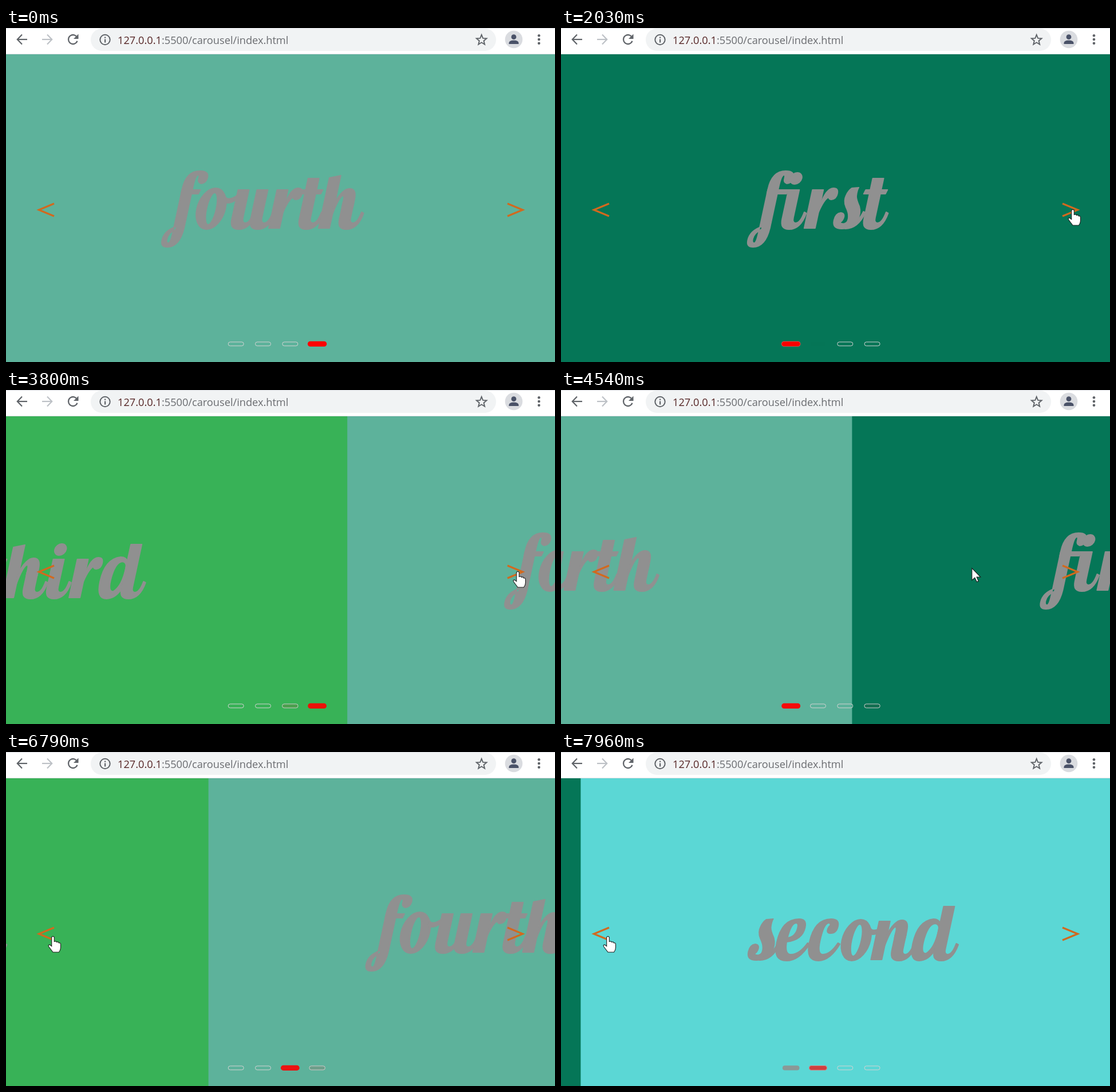
Animation, 959 px wide and 584 px high, one loop 8000 ms. Source, as an HTML page with a canvas:

```html
<!DOCTYPE html>
<html lang="en">
<head>
<meta charset="utf-8">
<title>Carousel</title>
<style>
html, body { margin: 0; width: 100%; height: 100%; overflow: hidden; background: #fff; }
canvas { display: block; width: 959px; height: 584px; }
</style>
</head>
<body>
<canvas id="stage" width="959" height="584" role="img" aria-label="Carousel: first, second, third, fourth"></canvas>
<script>
const g = document.getElementById('stage').getContext('2d');
const W = 959, H = 584, BAR = 46, LOOP = 8000;
const PITCH = 965, REST = -3, SLIDE = 690, FADE = 480;
const SLANT = 0.215;

// Script letters, drawn upright on the baseline and slanted when painted.
const hook = (x, h) =>
  `M${x} ${-h}h19V-18q0 9 6 9q8 0 11-19l4 2q-4 28-24 28q-16 0-16-18z`;
const bar = x => `M${x}-67h38l-2 7h-38z`;
const disc = (x, y, r) => `M${x - r} ${y}a${r} ${r} 0 1 0 ${2 * r} 0a${r} ${r} 0 1 0 ${-2 * r} 0z`;
const arch = 'M17-40Q26-69 39-69Q52-69 52-50V-38H33V-50Q33-58 30-57Q24-54 19-25z';
const F = 'M0 6V-68Q0-100 24-100Q41-100 40-87Q39-78 31-78Q24-80 25-87Q25-93 23-93Q18-93 18-70V0Q17 33-4 33Q-16 33-16 21Q-16 4 4-3V2Q-8 8-8 19Q-8 26-4 26Q0 26 0 6z';
const shapes = {
  f: [F, 'M0-67h32l-2 7h-30z'],
  F: [F, 'M0-67h36l-2 7h-34z', disc(45, -87, 10)],
  o: ['M0-34a25 36 0 1 0 50 0a25 36 0 1 0-50 0zM17-34a8.5 28 0 1 0 17 0a8.5 28 0 1 0-17 0z',
      'M44-56Q52-46 66-58l2 6Q56-40 44-46z'],
  u: [hook(0, 67), hook(33, 67)],
  r: ['M0-67h19V0h-19z', 'M19-40Q23-70 36-70Q45-70 45-60Q45-51 37-50Q33-50 31-54Q24-50 19-28z'],
  t: [hook(0, 87), bar(-8)],
  h: ['M0-88L19-92V0H0z', arch, hook(33, 45)],
  n: ['M0-67h19V0H0z', arch, hook(33, 45)],
  I: [hook(0, 67)],
  i: [hook(0, 67), disc(9, -84, 10)],
  s: ['M32-71Q30-66 31-56Q32-50 40-38Q46-26 42-14Q36 1 18 1Q1 1 1-14Q1-26 10-27Q18-26 17-18Q16-12 12-10Q15-7 20-8Q27-10 25-20Q24-27 17-37Q10-48 13-58Q15-66 20-70z',
      'M28-6Q44-9 49-29l4 2Q46 1 24 1z'],
  e: ['M54-29l4 2Q46 2 24 2Q0 2 0-30Q0-71 30-71Q44-71 44-56Q44-34 17-31Q18-9 29-9Q44-9 54-29zM17-38Q31-40 31-56Q31-64 27-64Q18-64 17-38z'],
  c: ['M50-29l4 2Q43 2 23 2Q0 2 0-30Q0-71 29-71Q44-71 44-58Q44-46 34-46Q26-46 27-54Q28-58 30-60Q30-64 27-64Q18-64 18-32Q18-9 28-9Q41-9 50-29z'],
  d: ['M42-62Q36-71 27-71Q0-68 0-28Q0 2 18 2Q34 2 42-18zM40-52Q40-20 27-11Q18-9 18-30Q19-62 32-63Q40-62 40-52z',
      hook(40, 93)]
};
const glyphs = {};
for (const k in shapes) glyphs[k] = shapes[k].map(d => new Path2D(d));

const slides = [
  { color: '#057657', word: 'FIrst', base: 350, xs: [347, 383, 425, 473, 526] },
  { color: '#5bd7d5', word: 'second', base: 363, xs: [286, 333, 390, 446, 504, 571] },
  { color: '#38b257', word: 'third', base: 363, xs: [323, 360, 434, 476, 524] },
  { color: '#5db29b', word: 'fourth', base: 350, xs: [293, 326, 391, 459, 509, 546] }
];

// Clicks: start time and direction.
const clicks = [[1215, 1], [2025, 1], [2816, 1], [3505, 1], [4208, 1],
                [5755, -1], [6499, -1], [7180, -1], [7865, -1]];

function bezier(x1, y1, x2, y2) {
  const at = (a, b, s) => 3 * (1 - s) * (1 - s) * s * a + 3 * (1 - s) * s * s * b + s * s * s;
  return x => {
    if (x <= 0) return 0;
    if (x >= 1) return 1;
    let lo = 0, hi = 1;
    for (let i = 0; i < 24; i++) {
      const mid = (lo + hi) / 2;
      if (at(x1, x2, mid) < x) lo = mid; else hi = mid;
    }
    return at(y1, y2, lo);
  };
}
const inOut = bezier(0.42, 0, 0.58, 1);
const ease = bezier(0.25, 0.1, 0.25, 1);
const wrap = i => (i + 4) % 4;

function carousel(t) {
  let from = 3, to = 3, dir = 1, start = -LOOP;
  for (const [at, d] of clicks) {
    if (t < at) break;
    from = to;
    to = wrap(to + d);
    dir = d;
    start = at;
  }
  return { from, to, dir, p: inOut((t - start) / SLIDE), q: ease((t - start) / FADE) };
}

function drawSlide({ color, word, base, xs }, left) {
  if (left >= W || left + PITCH <= 0) return;
  g.fillStyle = color;
  g.fillRect(left, BAR, PITCH, H - BAR);
  g.fillStyle = g.strokeStyle = '#909090';
  g.lineWidth = 2;
  xs.forEach((x, i) => {
    g.save();
    g.lineJoin = 'round';
    g.transform(1, 0, -SLANT, 1, left - REST + x, base);
    for (const path of glyphs[word[i]]) {
      g.fill(path, 'evenodd');
      g.stroke(path);
    }
    g.restore();
  });
}

function line(points, color, width, close) {
  g.beginPath();
  points.forEach(([x, y]) => g.lineTo(x, y));
  if (close) g.closePath();
  g.strokeStyle = color;
  g.lineWidth = width;
  g.stroke();
}

function circle(x, y, r, color) {
  g.beginPath();
  g.arc(x, y, r, 0, Math.PI * 2);
  g.fillStyle = color;
  g.fill();
}

function pill(x, y, w, h, r) {
  g.beginPath();
  g.roundRect(x, y, w, h, r);
}

function drawDots({ from, to, q }) {
  for (let i = 0; i < 4; i++) {
    const on = i === to ? q : i === from ? 1 - q : 0;
    const cx = 401.7 + i * 47.3, cy = 552.4, k = 1 + 0.19 * on;
    const w = 28 * k, h = 7.8 * k;
    if (on > 0) {
      pill(cx - w / 2, cy - h / 2, w, h, 4 * k);
      g.fillStyle = `rgba(255,0,0,${on})`;
      g.fill();
    }
    if (i !== to) {
      pill(cx - w / 2 + 0.5, cy - h / 2 + 0.5, w - 1, h - 1, 3.5);
      g.strokeStyle = `rgba(211,211,211,${1 - 0.7 * on})`;
      g.lineWidth = 1;
      g.stroke();
    }
  }
}

function drawBar() {
  const ink = '#5f6368';
  g.fillStyle = '#fff';
  g.fillRect(0, 0, W, BAR);
  g.fillStyle = '#dfe1e5';
  g.fillRect(0, 0, W, 1);
  g.fillRect(0, BAR - 1, W, 1);
  line([[37, 20], [20, 20]], ink, 2.2);
  line([[28, 11.5], [19.8, 20], [28, 28.5]], ink, 2.2);
  line([[63, 20], [80, 20]], '#bdc1c6', 2.2);
  line([[72, 11.5], [80.2, 20], [72, 28.5]], '#bdc1c6', 2.2);

  g.beginPath();
  g.arc(117, 20, 8, 0.35, 5.5);
  g.strokeStyle = ink;
  g.lineWidth = 2.3;
  g.stroke();
  g.fillStyle = ink;
  g.fill(new Path2D('M126.5 10.5v8.5h-8.5z'));

  pill(148, 1, 708, 39, 19.5);
  g.fillStyle = '#f1f3f4';
  g.fill();
  g.beginPath();
  g.arc(173, 20.5, 8.7, 0, Math.PI * 2);
  g.lineWidth = 2;
  g.stroke();
  g.fillStyle = ink;
  g.fillRect(172, 19.5, 2.2, 6);
  g.fillRect(172, 15.5, 2.2, 2.2);

  const host = '127.0.0.1';
  g.font = '18.2px "Open Sans", "Noto Sans", sans-serif';
  g.fillStyle = '#562626';
  g.fillText(host, 195, 27.5);
  const end = 195 + g.measureText(host).width;
  g.fillStyle = '#6a6c70';
  g.fillText(':5500/carousel/index.html', end, 27.5);

  const star = [];
  for (let i = 0; i < 10; i++) {
    const a = i * Math.PI / 5 - Math.PI / 2, r = i % 2 ? 4.1 : 9.3;
    star.push([830.7 + r * Math.cos(a), 21.2 + r * Math.sin(a)]);
  }
  line(star, ink, 1.9, true);

  circle(887, 20, 15.3, '#dadce0');
  circle(887, 15.7, 4.4, '#4a5268');
  g.fill(new Path2D('M878.5 28V26Q879 21.5 887 21.5Q895 21.5 895.5 26V28z'));
  for (const y of [13.2, 20, 26.8]) circle(931, y, 2.3, ink);
}

const arrow = new Path2D('M.5 .5V21.5L5.5 17L9 24.5L12 23.2L8.8 16H15.5z');
const hand = new Path2D('M-2.3 2Q0-1.5 2.3 2V9.5Q5.5 8 6.6 10.5Q9.6 9 10.4 12Q13.5 11 13.5 14.5V20Q13.5 24 10.5 28H0L-6.8 19Q-9.5 15-5.5 15L-2.3 17.5z');
const mix = (a, b, k) => a + (b - a) * k;
const span = (t, a, b) => Math.min(1, Math.max(0, (t - a) / (b - a)));

function pointer(t) {
  if (t < 4400) {
    const s = ease(span(t, 220, 910)), r = 1 - s;
    return [r * r * 898 + 2 * r * s * 848 + s * s * 894, mix(584, 317, s)];
  }
  if (t < 4540) {
    const s = span(t, 4400, 4540) ** 1.5;
    return [mix(894, 719, s), mix(317, 311, s)];
  }
  const s = span(t, 4540, 5290), k = 1 - (1 - s) ** 2;
  const n = inOut(span(t, 5540, 5690));
  return [mix(719, mix(86, 82, n), k), mix(311, mix(325, 322, n), k)];
}

function drawPointer(t) {
  if (t < 260) return;
  const [x, y] = pointer(t);
  const over = Math.abs(y - 318) < 24 && (x > 868 || x < 92);
  const path = over ? hand : arrow;
  g.save();
  g.translate(x, y);
  g.fillStyle = '#fff';
  g.fill(path);
  g.strokeStyle = '#1c1c1c';
  g.lineWidth = 1.1;
  g.stroke(path);
  g.restore();
}

function draw(t) {
  const c = carousel(t);
  const left = REST - c.dir * PITCH * c.p;
  drawSlide(slides[c.from], left);
  drawSlide(slides[c.to], left + c.dir * PITCH);
  line([[84, 307], [57.5, 318], [84, 329]], '#d2691e', 3.2);
  line([[876, 307], [902.5, 318], [876, 329]], '#d2691e', 3.2);
  drawDots(c);
  drawBar();
  drawPointer(t);
}

const begin = performance.now();
function tick() {
  draw((performance.now() - begin) % LOOP);
  requestAnimationFrame(tick);
}
tick();
</script>
</body>
</html>
```
